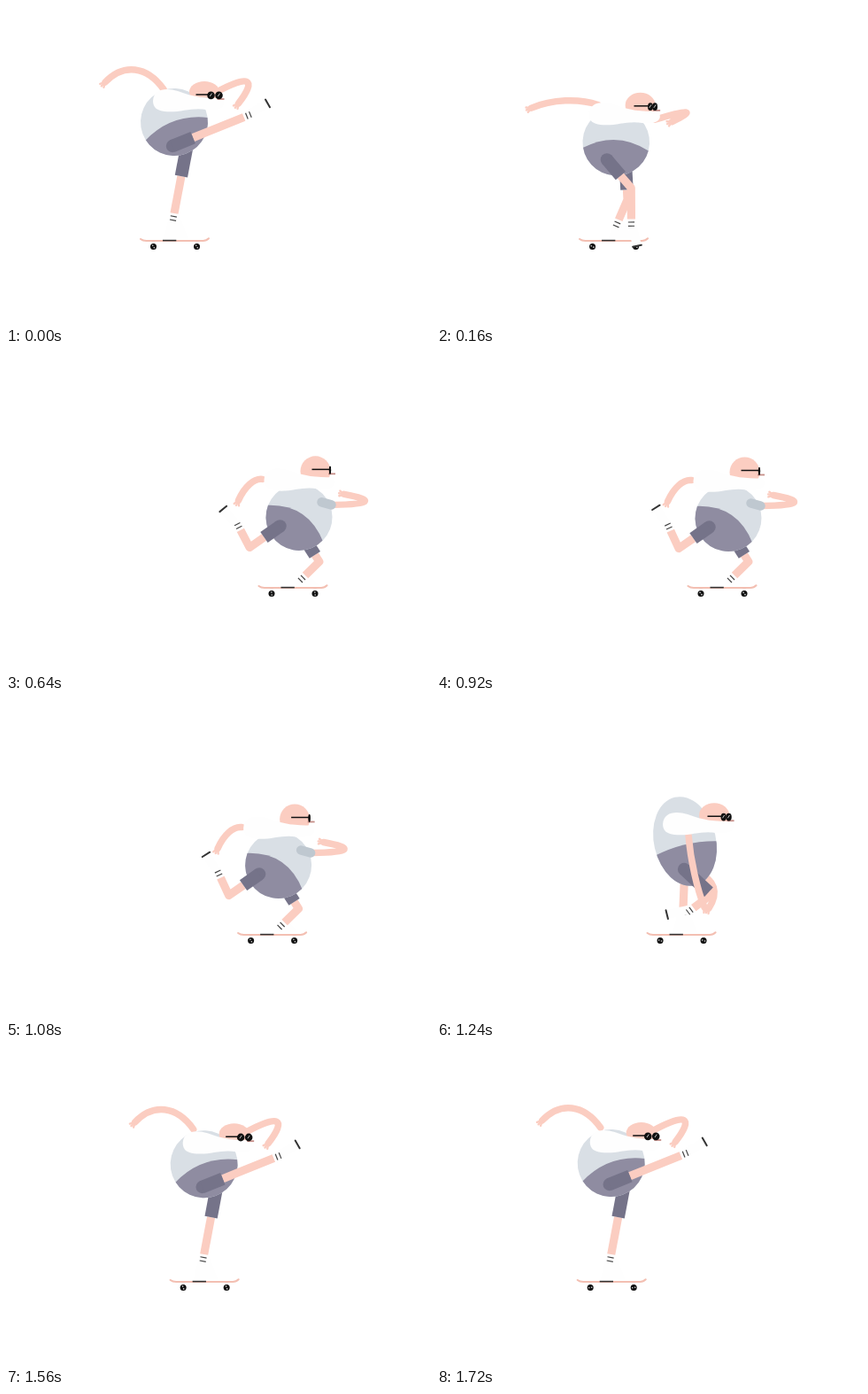
These frames come from a looping animation (480 by 360 pixels, 1.76 s). An HTML page with a canvas:

```html
<!DOCTYPE html>
<html lang="en">
<head>
<meta charset="utf-8">
<title>Skater</title>
<style>
html, body { margin: 0; width: 100%; height: 100%; overflow: hidden; background: #fff; }
canvas { display: block; }
</style>
</head>
<body>
<canvas id="stage" width="480" height="360"></canvas>
<script>
const ctx = document.getElementById('stage').getContext('2d');
const LOOP = 1760, STEP = 40, TAU = Math.PI * 2;
const SKIN = '#fbcdc1', SHIRT = '#d9dfe5', SHORTS = '#8f8ca1', THIGH = '#757389';
const SLEEVE = '#bfc8d0', WHITE = '#fefefe', INK = '#111', DARK = '#444';

// x is measured from the middle of the board.
// torso: rx ry tilt waist; turn: 0 faces us, 1 in profile; arms: shoulder, elbow, hand
// stand: hip, ankle; leg: cuff, shin length, angles of thigh, shin and foot
const kick = {
  hub: [-0.5, 131], torso: [38, 38, -20, -1],
  head: [33.5, 97], turn: [0],
  back: [-12.5, 94, -44, 50, -78.5, 86],
  front: [47.5, 97, 108, 63.5, 72, 110],
  stand: [13.5, 160, -0.5, 234], bend: [0],
  hip: [-2.5, 158], leg: [25, 45, -22, -22, -30]
};

const glide = {
  hub: [7, 184], torso: [37.5, 37.5, 33, -5],
  head: [25.5, 132], turn: [1],
  back: [-34.5, 141, -50, 139, -61.5, 165],
  front: [45.5, 170, 117, 169, 58, 158],
  stand: [13.5, 210, 14, 251], bend: [16],
  hip: [-14.5, 194], leg: [22, 22, 145, 239, 222]
};

const crouch = {
  hub: [4, 159.5], torso: [35, 51, -13, 3.5],
  head: [37, 130], turn: [0.35],
  back: [19, 196, 50, 206, 31, 235],
  front: [8, 153, 12, 200, 26, 234],
  stand: [4, 185, 2, 234], bend: [0],
  hip: [3, 191], leg: [38, 25, 43, 143, 166]
};

function between(a, b, k) {
  const pose = {};
  for (const part in a) pose[part] = a[part].map((v, i) => v + (b[part][i] - v) * k);
  return pose;
}

function lift(pose, parts, dy) {
  const moved = { ...pose };
  for (const part of parts) moved[part] = pose[part].map((v, i) => v + i % 2 * dy);
  return moved;
}

const windUp = { ...between(kick, glide, 0.3), back: [-14, 105, -55, 90, -100, 104] };
const reach = { ...between(glide, crouch, 0.5), front: [35, 166, 75, 160, 112, 160] };
const sink = lift(glide, ['hub', 'head', 'back', 'front', 'hip'], 2.5);
sink.leg = [22, 22, 145, 245, 238];
const land = lift(kick, ['hub', 'head', 'hip'], 2);
const rise = lift(kick, ['back', 'front', 'hip'], -3);

const poses = [
  [0, kick], [100, windUp], [320, glide], [920, sink], [1120, sink], [1180, reach],
  [1240, crouch], [1260, crouch], [1420, land], [1440, land], [1720, rise], [LOOP, kick]
];

const ride = [
  [0, 190.5], [110, 174], [240, 256], [320, 292.5], [560, 321], [640, 324],
  [760, 327], [920, 322], [1120, 294.5], [1440, 244], [LOOP, 190.5]
];

function segment(keys, t) {
  let i = 0;
  while (i < keys.length - 2 && t >= keys[i + 1][0]) i++;
  return i;
}

function poseAt(t) {
  const i = segment(poses, t);
  const [t0, a] = poses[i], [t1, b] = poses[i + 1];
  const u = (t - t0) / (t1 - t0);
  return between(a, b, u * u * (3 - 2 * u));
}

// Smooth curve through the ride keys
function rideAt(t) {
  const slope = i => {
    const a = ride[Math.max(i - 1, 0)], b = ride[Math.min(i + 1, ride.length - 1)];
    return (b[1] - a[1]) / (b[0] - a[0]);
  };
  const i = segment(ride, t);
  const [t0, x0] = ride[i], [t1, x1] = ride[i + 1];
  const d = t1 - t0, u = (t - t0) / d, v = 1 - u;
  return x0 * (1 + 2 * u) * v * v + slope(i) * d * u * v * v
    + x1 * u * u * (3 - 2 * u) - slope(i + 1) * d * u * u * v;
}

const mix = (a, b, k) => [a[0] + (b[0] - a[0]) * k, a[1] + (b[1] - a[1]) * k];
const angle = (a, b) => Math.atan2(b[1] - a[1], b[0] - a[0]);
const step = (p, a, d) => [p[0] + Math.cos(a) * d, p[1] + Math.sin(a) * d];
const rad = deg => deg * Math.PI / 180;

function stroke(color, width, cap = 'butt') {
  ctx.strokeStyle = color;
  ctx.lineWidth = width;
  ctx.lineCap = cap;
  ctx.lineJoin = 'round';
  ctx.stroke();
}

function trace(pts) {
  ctx.beginPath();
  for (const p of pts) ctx.lineTo(...p);
}

function line(pts, color, width, cap) {
  trace(pts);
  stroke(color, width, cap);
}

function polygon(pts, color) {
  trace(pts);
  ctx.fillStyle = color;
  ctx.fill();
}

function oval(x, y, rx, ry, color, turn = 0) {
  ctx.beginPath();
  ctx.ellipse(x, y, rx, ry, turn, 0, TAU);
  ctx.fillStyle = color;
  ctx.fill();
}

// A short bar across the given direction
function bar(p, a, half, color, width, cap) {
  line([step(p, a + TAU / 4, half), step(p, a - TAU / 4, half)], color, width, cap);
}

function drawBoard(x) {
  ctx.beginPath();
  ctx.moveTo(-38.5, 263);
  ctx.quadraticCurveTo(-36, 265, -32, 265);
  ctx.lineTo(32, 265);
  ctx.quadraticCurveTo(36, 265, 38.5, 262.3);
  stroke('#f3bfb2', 2.1, 'round');
  line([[-13.5, 264.6], [1.8, 264.6]], '#333', 1.6);
  for (const wx of [-24, 25]) {
    oval(wx, 271.5, 3.5, 3.6, INK);
    for (const side of [0, TAU / 2]) {
      oval(...step([wx, 271.5], x / 3.5 + side, 1.5), 0.8, 0.8, '#ddd');
    }
  }
}

function drawArm(p) {
  const [from, elbow, hand] = [0, 2, 4].map(i => p.slice(i, i + 2));
  ctx.beginPath();
  ctx.moveTo(...from);
  ctx.bezierCurveTo(...mix(from, elbow, 0.6), ...mix(hand, elbow, 0.6), ...hand);
  stroke(SKIN, 7.5, 'round');
  for (const spread of [-0.5, 0, 0.5]) {
    line([hand, step(hand, angle(elbow, hand) + spread, 6)], SKIN, 2.4, 'round');
  }
}

function drawLeg(hip, cuff, knee, ankle) {
  line([cuff, knee, ankle], SKIN, 9.2);
  line([hip, cuff], THIGH, 14.5);
  const a = angle(knee, ankle);
  for (const d of [3.5, 7.8]) bar(step(ankle, a, d), a, 3.6, DARK, 1.2);
}

function drawStand({ stand, bend }) {
  const hip = stand.slice(0, 2), ankle = stand.slice(2);
  const knee = mix(hip, ankle, 0.62);
  knee[0] += bend[0];
  const [x, y] = ankle;
  polygon([[x - 5, y], [x + 5, y], [x + 16, 263], [x - 12, 263]], WHITE);
  drawLeg(hip, mix(hip, knee, 0.7), knee, ankle);
}

function drawKick({ hip, leg }) {
  const [cuff, shin] = leg;
  const [thighTurn, shinTurn, footTurn] = leg.slice(2).map(rad);
  const knee = step(hip, thighTurn, 42);
  const ankle = step(knee, shinTurn, shin);
  const sole = step(ankle, footTurn, 31);
  line([step(ankle, shinTurn, 2), sole], WHITE, 10);
  oval(...hip, 7.2, 7.2, THIGH);
  drawLeg(hip, step(hip, thighTurn, cuff), knee, ankle);
  bar(sole, footTurn, 5, '#333', 2, 'round');
}

function drawBody([x, y], [rx, ry, tilt, waist]) {
  oval(x, y, rx, ry, SHIRT, rad(tilt));
  ctx.save();
  ctx.clip();
  ctx.translate(x, y);
  ctx.rotate(rad(tilt));
  ctx.beginPath();
  ctx.moveTo(-38, 8.5);
  ctx.quadraticCurveTo(0, 2 * waist - 8.5, 38, 8.5);
  ctx.lineTo(60, 70);
  ctx.lineTo(-60, 70);
  ctx.fillStyle = SHORTS;
  ctx.fill();
  ctx.restore();
}

function drawSleeve([x, y], alpha) {
  ctx.globalAlpha = alpha;
  line([[x - 13, y - 3], [x - 2, y]], SLEEVE, 10.5, 'round');
  ctx.globalAlpha = 1;
}

function drawHead([x, y], turn) {
  ctx.save();
  ctx.translate(x, y);
  oval(0, 0, 17, 12 + 5 * turn, SKIN);

  // Beard blown back over the shoulder
  ctx.beginPath();
  ctx.moveTo(-58, 10);
  ctx.bezierCurveTo(-57, -4, -43, -5, -30, -1);
  ctx.bezierCurveTo(-12, 6, 0, 7, 20, 7);
  ctx.bezierCurveTo(26, 15, 20, 22, 2, 20);
  ctx.bezierCurveTo(-15, 17, -28, 24, -45, 22);
  ctx.bezierCurveTo(-53, 21, -58, 18, -58, 10);
  ctx.fillStyle = WHITE;
  ctx.fill();

  const far = 16.5, near = far - 9 * (1 - turn), sy = 3 - 5 * turn;
  line([[far - 2, sy + 5], [far + 6, sy + 5]], '#c58d87', 1.8);
  line([[5.5 * turn - 9.5, sy], [near, sy]], INK, 1.5);
  for (const lens of [near, far]) {
    oval(lens, sy + 0.8, 4.3 - 3.2 * turn, 4.4, INK);
    if (turn < 0.5) line([[lens - 1.2, sy + 2], [lens + 1, sy - 1.4]], '#ddd', 0.9);
  }
  ctx.restore();
}

function draw(t) {
  const x = rideAt(t), p = poseAt(t), turn = p.turn[0];
  ctx.fillStyle = '#fff';
  ctx.fillRect(0, 0, 480, 360);
  ctx.save();
  ctx.translate(x, 0);
  drawArm(p.back);
  drawStand(p);
  drawBoard(x);
  drawBody(p.hub, p.torso);
  drawKick(p);
  drawArm(p.front);
  drawSleeve(p.front, Math.max(0, 2 * turn - 1));
  drawHead(p.head, turn);
  ctx.restore();
}

function tick(now) {
  draw(Math.floor(now % LOOP / STEP) * STEP);
  requestAnimationFrame(tick);
}

draw(0);
requestAnimationFrame(tick);
</script>
</body>
</html>
```
